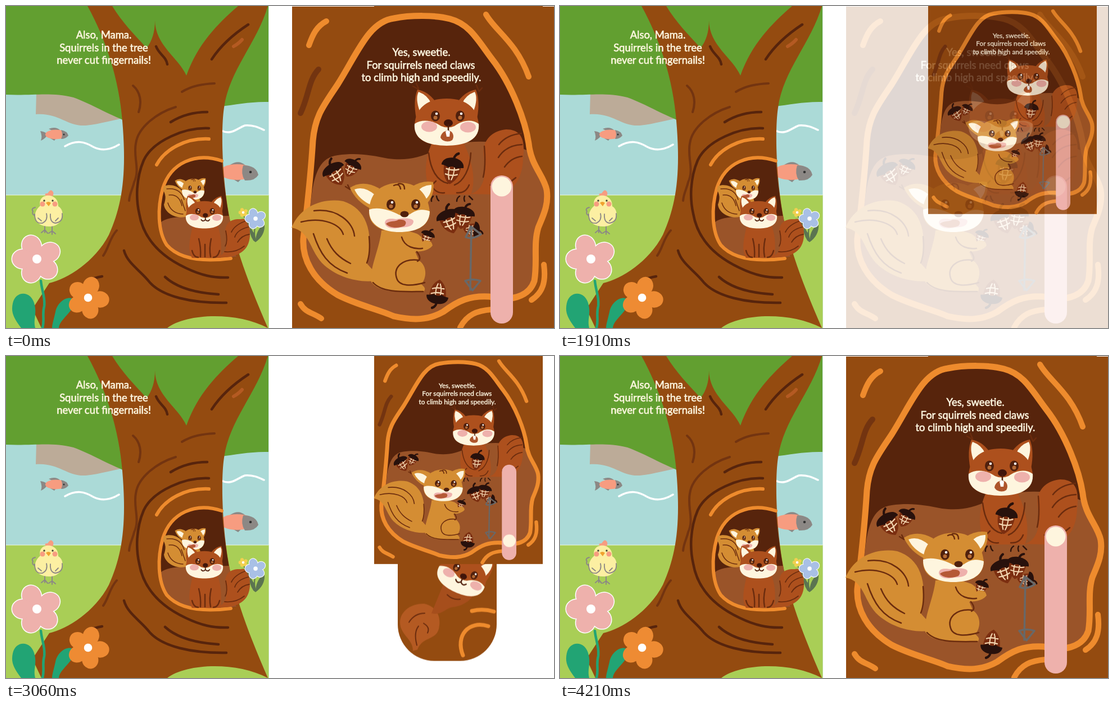
An HTML page for the animation above (4810 ms loop, 975x574 px).

```html
<!DOCTYPE html>
<html lang="en">
<head>
<meta charset="utf-8">
<title>Squirrel picture book</title>
<style>
html, body { margin: 0; width: 100%; height: 100%; overflow: hidden; background: #fff; }
svg { display: block; }
#stage { position: absolute; left: 0; top: 0; }
text { font: 18.4px Lato, "Open Sans", sans-serif; fill: #fff8e2; stroke: #fff8e2; stroke-width: .6; text-anchor: middle; }
.line { fill: none; stroke-linecap: round; stroke-linejoin: round; }
.bark { stroke: #733410; stroke-width: 4; }
.deep { stroke: #57240c; stroke-width: 4.5; }
.glow { stroke: #ee8b2d; }
.fur { stroke: #6b2c0e; stroke-width: 2.5; }
.wood { fill: #944b10; }
.dark { fill: #57240c; }
.floor { fill: #9a5429; }
.red { fill: #ad501d; }
.tan { fill: #d48d33; }
.cream { fill: #fef5de; }
.pink { fill: #eeb1ac; }
.eye { fill: #50200d; }
.teal { fill: #22a474; }
.coral { fill: #f79c80; }
.grey { fill: #8c8885; }
</style>
</head>
<body>
<svg id="stage" width="975" height="574" viewBox="0 0 975 574">
<defs>
  <g id="eyes">
    <ellipse class="eye" cx="-22" rx="8" ry="9.5"/><ellipse class="eye" cx="22" rx="8" ry="9.5"/>
    <g fill="#b46a35"><circle cx="-22" cy="3" r="3.5"/><circle cx="22" cy="3" r="3.5"/></g>
    <g fill="#fff"><circle cx="-20" cy="-4" r="2.3"/><circle cx="24" cy="-4" r="2.3"/></g>
  </g>

  <g id="redEar">
    <path class="red" d="M-54-4Q-60-36-52-56Q-34-53-21-36Z"/>
    <path class="cream" d="M-48-18Q-56-40-50-52Q-34-46-28-32Q-41-27-48-18Z"/>
  </g>

  <g id="redHead">
    <use href="#redEar"/><use href="#redEar" transform="scale(-1 1)"/>
    <path class="red" d="M-57 8C-56-20-38-40 0-40S56-20 57 8C57 36 30 44 0 44S-57 36-57 8Z"/>
    <path class="cream" d="M-57 5C-42-5-23 0-10 9Q2 14 14 9C26 0 43-5 57 5C60 35 30 44 0 44S-60 35-57 5Z"/>
    <ellipse class="pink" cx="-31" cy="10" rx="14" ry="9.5"/><ellipse class="pink" cx="38" cy="11" rx="14" ry="9.5"/>
    <use href="#eyes" x="2" y="-9"/>
    <ellipse cx="3" cy="3.5" rx="8" ry="6.5" fill="#40150a"/>
  </g>

  <path id="smile" class="line" stroke="#50200d" stroke-width="3" d="M3 8v9M-10 17Q-4 25 3 17Q10 25 16 17"/>

  <g id="tanHead">
    <path class="tan" d="M-36-35Q-65-51-88-36Q-78-12-50 2Z"/>
    <path class="cream" d="M-42-22Q-62-40-80-33Q-72-15-50-5Q-49-14-42-22Z"/>
    <path class="tan" d="M22-38Q42-50 60-46Q64-24 46-4Z"/>
    <path class="cream" d="M28-26Q42-42 57-41Q58-24 44-13Q38-23 28-26Z"/>
    <path class="tan" d="M-54 10C-55-25-35-45 3-45C36-44 52-20 54 8C52 36 25 43 0 43S-52 36-54 10Z"/>
    <path class="cream" d="M-54 3C-38-3-16 4-1 12Q9 17 19 11C30 3 42 1 54 6C53 35 26 43 0 43S-55 33-54 3Z"/>
    <use href="#eyes" x="7" y="-6"/>
    <ellipse cx="9" cy="11" rx="7.5" ry="5.5" fill="#50200d"/>
    <path class="pink" d="M-26 27C-26 17-12 19-6 20C4 18 25 17 25 24C24 35 9 34 1 35C-10 38-24 37-26 27Z"/>
    <path fill="#b55936" d="M-24 28C-17 22-7 25-2 21C10 20 15 25 9 32C-2 37-19 36-24 28Z"/>
    <path class="line fur" d="M-10-40Q0-45 2-34M-2-43Q9-45 9-34"/>
  </g>

  <g id="acorn">
    <path fill="#7b2e10" d="M-15-4C-16 13-7 21 0 25C7 21 16 13 15-4Z"/>
    <path class="line" stroke="#f3d6b1" stroke-width="2" d="M-10 3Q2 5 12 1M-10 11Q2 13 11 9M-5 1Q-6 11-2 18M4 0Q5 11 2 18"/>
    <path fill="#28110c" d="M-20-2C-20-19 20-19 20-2Q10-1 7 1Q0-4-7 1Q-12-2-20-2Z"/>
    <path class="line" stroke="#28110c" stroke-width="4" d="M0-13Q1-20 7-22"/>
  </g>

  <ellipse id="petal" cy="-25" rx="17" ry="19"/>
  <g id="petals">
    <circle r="14"/>
    <use href="#petal" transform="rotate(-22)"/><use href="#petal" transform="rotate(62)"/>
    <use href="#petal" transform="rotate(134)"/><use href="#petal" transform="rotate(202)"/>
    <use href="#petal" transform="rotate(270)"/>
  </g>

  <path id="rim" d="M690 22C645 28 625 85 590 140C565 178 550 195 546 240C543 290 537 350 529 415C527 450 545 488 590 515C625 533 660 540 690 553C725 561 752 560 778 545C805 525 825 516 860 518C895 527 930 520 940 490C946 455 938 425 947 395C955 375 966 355 962 328C957 302 934 285 930 245C924 205 900 140 865 95C840 62 825 32 790 23C765 16 720 16 690 22Z"/>

  <g id="hollow">
    <rect class="wood" x="509" y="1" width="466" height="576"/>
    <use href="#rim" class="dark"/>
    <path class="floor" d="M544 335C550 295 560 270 590 266C625 261 650 266 680 272C715 276 735 270 765 257C805 239 870 234 929 258C936 290 957 310 961 340C962 375 944 400 942 430C948 500 930 525 895 524C850 510 815 514 785 540C750 564 705 561 680 549C635 535 560 518 534 455C526 430 538 385 544 335Z"/>
    <use href="#rim" class="line glow" stroke-width="11"/>
    <path class="line glow" stroke-width="10" d="M570 27C553 36 546 50 539 70M854 15C870 44 908 64 930 126M524 531C533 547 545 546 561 557M957 461C961 492 955 511 935 524M808 573C820 550 838 543 864 541"/>
    <path class="line bark" style="stroke-width:10" d="M556 113C538 132 539 160 524 191"/>

    <path class="red" d="M826 335C850 329 856 300 850 268C846 240 865 222 890 220C918 220 924 240 920 270C920 302 906 336 866 336Z"/>
    <path class="line fur" d="M917 227Q890 230 877 247M918 247Q890 248 876 270M918 268Q899 270 887 287M907 306Q887 324 862 319M851 250Q854 285 849 305"/>
    <path class="red" d="M757 246C744 275 743 310 758 336H827C837 310 829 275 815 246Z"/>
    <path class="line fur" d="M752 262C755 290 766 312 786 316M827 262C826 290 814 313 798 319M757 320Q765 335 780 333M824 319Q818 334 802 333"/>
    <path class="line" stroke="#33160c" stroke-width="2.5" d="M754 339q-8 2-9 8m15-8q-4 4-3 9m9-9q1 6 4 8m37-8q-5 3-5 9m14-9q-2 4 0 9m8-9q4 4 6 6"/>
    <path class="line fur" d="M733 148l-9-5m10 4l-4-9m111 13l-4-10m5 11l5-6"/>
    <use href="#redHead" x="784" y="205"/>
    <path fill="#ae552b" d="M773 234C775 224 783 222 787 222C796 223 798 233 794 239C787 244 775 241 773 234Z"/>
    <path class="line" stroke="#50200d" stroke-width="2.5" d="M787 212v10"/>
    <path fill="#fff" d="M782 224q4-5 8 0l-1 9h-5Z"/>
    <use href="#acorn" transform="translate(794 288) rotate(10) scale(1 1.2)"/>

    <use href="#acorn" transform="translate(584 296) rotate(-30) scale(1.06)"/>
    <use href="#acorn" transform="translate(616 286) rotate(28) scale(.82)"/>
    <use href="#acorn" transform="translate(788 379) rotate(-18) scale(1.1)"/>
    <use href="#acorn" transform="translate(814 373) rotate(12)"/>
    <use href="#acorn" transform="translate(832 399) rotate(95) scale(.75)"/>
    <use href="#acorn" transform="translate(768 515) rotate(188) scale(.98 1.1)"/>

    <path class="tan" d="M508 395C525 355 565 342 600 348C640 361 655 400 643 460L668 488C635 496 590 486 562 458C538 430 541 402 508 395Z"/>
    <path class="line fur" d="M548 365C590 360 618 386 620 410M525 385C565 375 595 390 600 407M547 406C558 440 573 464 607 476M571 415C580 437 593 449 613 459M646 411Q649 440 642 458"/>
    <path class="tan" d="M668 400C665 430 648 465 649 490C660 512 705 510 743 509Q749 504 739 496C750 482 748 462 735 454L728 438Q750 438 759 427Q756 414 738 411Q728 398 668 400Z"/>
    <path class="line fur" d="M704 412C709 430 728 434 741 432M735 453C704 449 689 467 695 485C699 500 721 500 745 493M731 438Q741 451 732 455M653 493C670 512 710 509 742 509"/>
    <use href="#acorn" transform="translate(750 410) rotate(22) scale(.64)"/>
    <path class="tan" d="M739 421Q751 413 758 424Q758 432 746 434Z"/>
    <path class="line fur" d="M612 327l-8-5m8 5l-4-8m152-2l5-5"/>
    <use href="#tanHead" x="700" y="360"/>

    <path class="line" stroke="#686868" stroke-width="3.5" d="M828 394L826 506M827 393L818 412Q829 417 845 407ZM817 490Q830 485 844 490L830 507Z"/>
    <rect class="pink" x="862" y="302" width="40" height="264" rx="20"/>
    <text x="739" y="89">Yes, sweetie.</text>
    <text x="738" y="111.5">For squirrels need claws</text>
    <text x="739" y="134">to climb high and speedily.</text>
  </g>
</defs>

<svg id="meadow" width="467.5" height="574">
  <rect width="468" height="574" fill="#abdad7"/>
  <path fill="#bcab98" d="M54 155L53 193C95 190 108 215 142 213C170 210 190 203 210 200V155Z"/>
  <path fill="#629f30" d="M0 0H467V171C435 170 410 176 380 179L210 204C170 187 150 174 120 163C80 153 50 160 0 158Z"/>
  <rect y="337" width="468" height="237" fill="#a9ce56"/>
  <path stroke="#eef6e5" d="M0 337H468"/>
  <path class="line" stroke="#fff" stroke-width="3.5" d="M105 250C125 238 140 242 155 251C170 259 187 256 201 247M383 222C401 231 411 218 425 213C441 212 450 217 459 221"/>

  <path class="grey" d="M61 223Q70 224 74 229Q71 236 62 240Q65 232 61 223ZM76 219q12-5 20 2l-8 4ZM79 236l7 4 3-4Z"/>
  <ellipse class="coral" cx="89" cy="229" rx="19" ry="8.5"/>
  <path class="grey" d="M98 221Q109 223 111 231Q106 237 98 237Q102 229 98 221Z"/>
  <circle cx="103" cy="229" r="1.5" fill="#333"/>
  <path class="grey" d="M399 283q15-10 27 1ZM403 308l10 6 5-5Z"/>
  <ellipse class="coral" cx="411" cy="296" rx="31" ry="14"/>
  <path class="grey" d="M422 284Q445 284 449 301Q443 312 425 311Q417 299 422 284Z"/>
  <circle cx="435" cy="296" r="2.3" fill="#333"/>

  <path class="wood" d="M145 0C178 60 201 130 207 205C215 300 207 355 183 408C158 456 110 486 77 494L47 540L63 574H287C320 548 410 544 466 574C438 510 413 445 400 389C384 315 382 220 388 181C397 115 447 65 466 0H413C376 32 341 68 321 124C307 92 265 70 265 25C265 42 262 60 250 75C228 50 207 30 189 0Z"/>
  <path class="line bark" d="M226 142C239 153 242 171 236 189M313 153C331 142 350 139 371 138M302 180C270 190 235 215 231 245C226 269 239 291 228 314C225 327 220 334 219 347M197 400C184 414 183 431 173 445"/>
  <path class="line deep" d="M267 72C272 86 285 90 287 104M366 95C381 72 402 52 431 33M293 207C312 195 332 189 358 189M361 218C320 216 262 239 245 275C231 308 231 344 237 370C245 417 277 447 320 467C347 480 369 485 395 484M210 436C216 459 240 472 256 493C279 518 330 530 392 529M283 483C307 505 345 512 378 514M171 482Q145 486 131 505"/>
  <path class="line" stroke="#b45a22" stroke-width="6" d="M405 72Q414 67 420 60"/>
  <path class="line glow" stroke-width="6" d="M268 283C283 255 320 235 361 237"/>
  <path class="dark" d="M384 276C336 264 295 280 279 325C269 360 270 402 286 426C306 449 345 455 410 447C401 400 389 340 384 276Z"/>
  <path class="floor" d="M275 386C290 372 340 375 397 374L410 447C345 455 306 449 286 426Q276 407 275 386Z"/>
  <path class="line glow" stroke-width="6" d="M384 276C336 260 293 280 279 325C269 360 270 402 286 426C306 449 345 457 400 450"/>

  <path class="tan" d="M281 321C300 314 320 329 322 348L325 374C309 382 283 372 281 354Q287 338 279 328Z"/>
  <path class="tan" d="M312 343L319 366H350L344 342Z"/>
  <path class="line fur" style="stroke-width:1.5" d="M286 326Q310 323 317 345M290 337Q308 335 313 356M288 351Q294 370 315 371M312 345L319 365"/>
  <use href="#tanHead" transform="translate(333 327) scale(.37 .43)"/>
  <path class="red" d="M374 448C394 444 395 420 390 404C390 386 400 379 418 380C432 377 435 392 434 410C432 438 411 450 374 448Z"/>
  <path class="line fur" style="stroke-width:1.8" d="M427 383Q407 390 401 403M431 394Q411 399 407 412M433 407Q419 409 412 421M424 428Q409 440 389 438M391 401Q395 420 390 428"/>
  <path class="red" d="M333 389C326 418 323 436 331 449H382C384 423 382 402 375 389Z"/>
  <path class="line fur" d="M343 415Q347 430 346 447M365 415Q361 432 364 447M354 425V447M331 436Q334 448 342 448M380 436Q377 448 369 448"/>
  <g transform="translate(353 371) scale(.58)"><use href="#redHead"/><use href="#smile"/></g>

  <g class="line" stroke="#8c8885" stroke-width="2"><path d="M69 390V404m0-5l-6 5m6-5l5 6M82 389V407m0-6l-6 4m6-4l6 5M52 359q-8 2-4 7q-3 5 4 8"/></g>
  <path class="coral" d="M72 340Q66 333 74 334Q80 324 84 332Q86 337 80 341Z"/>
  <path fill="#fcefa2" d="M61 356C55 332 94 331 93 357C106 364 103 391 80 393C50 395 44 370 61 356Z"/>
  <path class="line" stroke="#8c8885" stroke-width="1.8" d="M51 371Q51 389 65 387Q75 382 72 370M79 371Q78 386 88 387Q102 385 100 370M57 378l6 5m30-5l-5 5"/>
  <path fill="#f0a22e" d="M71 351q4-4 9 0l-4 6Z"/>
  <g class="coral"><circle cx="65" cy="353" r="4.5"/><circle cx="87" cy="353" r="4.5"/></g>
  <g fill="#443"><circle cx="68" cy="347" r="1.7"/><circle cx="83" cy="347" r="1.7"/></g>

  <path fill="#5b7450" d="M440 418Q432 405 434 397Q443 402 444 416Q447 395 460 390Q461 409 444 421Z"/>
  <path class="line" stroke="#5b7450" stroke-width="2" d="M444 390Q440 405 444 418M424 376Q430 386 437 400"/>
  <g transform="translate(422 368) scale(.19)"><use href="#petals" fill="#f1d04f"/><circle r="12" fill="#fff"/></g>
  <g transform="translate(444 379) scale(.42)"><use href="#petals" stroke="#fff" stroke-width="5"/><use href="#petals" fill="#a9c0e6"/><circle r="9" fill="#fff"/></g>
  <path class="teal" d="M12 530C17 506 46 507 51 533C55 550 48 559 52 574H27C12 554 9 545 12 530ZM123 524C111 514 92 526 88 545C85 559 82 567 82 574H94C95 558 121 546 123 524Z"/>
  <path class="line" stroke="#22a474" stroke-width="4.5" d="M62 490C64 509 70 519 68 535C64 550 69 559 65 574"/>
  <g transform="translate(55 451)"><use href="#petals" stroke="#fff" stroke-width="3"/><use href="#petals" class="pink"/><circle r="8" fill="#fff"/></g>
  <g transform="translate(146 520) rotate(36) scale(.86)"><use href="#petals" fill="#ee8b33"/><circle r="8.5" fill="#fff"/></g>

  <text x="174" y="58">Also, Mama.</text>
  <text x="174" y="80.5">Squirrels in the tree</text>
  <text x="174" y="103">never cut fingernails!</text>
</svg>

<g id="tab">
  <path class="wood" d="M697 160H873V306A65 65 0 0 1 808 371H762A65 65 0 0 1 697 306Z"/>
  <path fill="#b45a22" d="M724 353C724 331 701 325 701 302C702 279 725 268 744 269C767 274 775 293 770 314C764 335 741 327 732 351Z"/>
  <path fill="#a64e1c" d="M757 286L790 205L835 240C836 260 812 274 795 275C782 277 774 291 757 286Z"/>
  <path class="line fur" style="stroke-width:2" d="M717 302Q727 286 745 286M734 309Q725 320 731 343M743 304Q755 311 750 321M785 253q10 10 23 8"/>
  <g transform="translate(813 217) rotate(25) scale(.78)"><use href="#redHead"/><use href="#smile"/></g>
  <path class="line glow" stroke-width="7" d="M829 282Q848 277 868 283M813 361C799 326 823 298 858 309"/>
</g>
<use href="#hollow" transform="scale(.6438) translate(508.4 -1)"/>
<circle id="knob" class="cream" cx="895.5" cy="207" r="11.3"/>
<g id="large">
  <use href="#hollow"/>
  <circle class="cream" cx="882" cy="322" r="17.5"/>
</g>
</svg>
<script>
const LOOP = 4810, STEP = 30;

// moves: [start ms, number of 30 ms steps, value reached]
function play(id, prop, first, moves) {
  const keys = [{ offset: 0, [prop]: first }];
  let value = first;
  for (const [at, count, next] of moves) {
    keys.push(
      { offset: at / LOOP, [prop]: value, easing: `steps(${count}, start)` },
      { offset: (at + count * STEP) / LOOP, [prop]: next });
    value = next;
  }
  keys.push({ offset: 1, [prop]: value });
  document.getElementById(id).animate(keys, { duration: LOOP, iterations: Infinity });
}

function slide(id, distance) {
  const rest = 'translateY(0px)';
  play(id, 'transform', rest, [[2000, 21, `translateY(${distance}px)`], [3000, 20, rest]]);
}

play('large', 'opacity', 1, [[1670, 11, 0], [3970, 9, 1]]);
slide('knob', 144);
slide('tab', 203);
</script>
</body>
</html>
```
